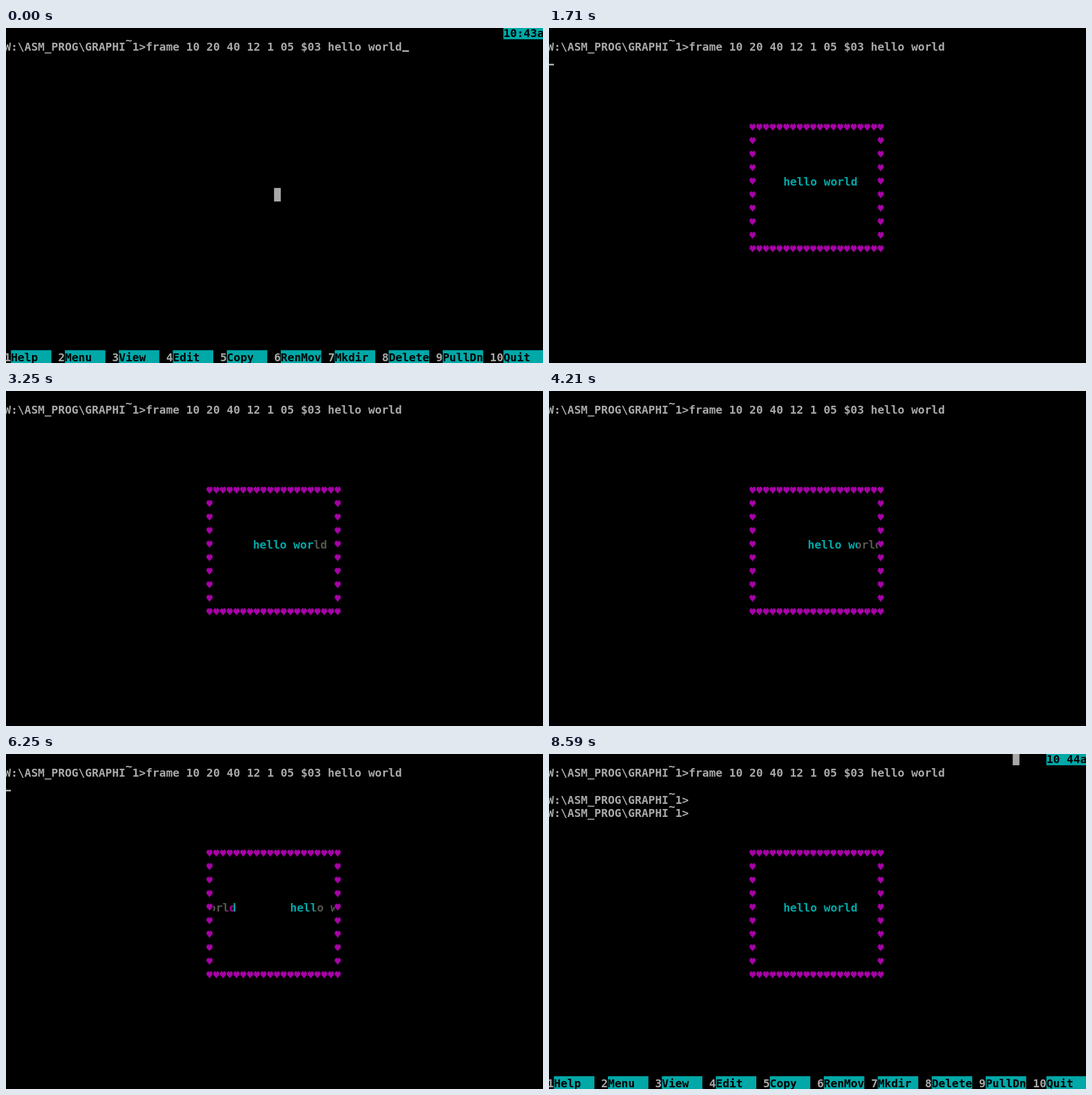
Write an HTML page that moves like this. It is 948 by 591 pixels and loops after 8.64 s.

```html
<!DOCTYPE html>
<html lang="en">
<head>
<meta charset="utf-8">
<title>Text mode frame</title>
<style>
  html, body { margin: 0; width: 100%; height: 100%; overflow: hidden; background: #000; }
  svg { display: block; }
  #screen { width: 948px; height: 591px; }
  text {
    font: bold 19.78px "DejaVu Sans Mono", monospace;
    white-space: pre;
  }
</style>
</head>
<body>
<svg id="screen" viewBox="0 0 948 591"></svg>
<script>
const LOOP = 8640;
const CW = 11.91, CH = 23.85, X0 = -3.2, Y0 = -4, PX = CW / 8, PY = CH / 14;
const GRAY = '#a8a8a8', CYAN = '#00a8a8', MAGENTA = '#a800a8', DARK = '#57554f', BLACK = '#000';

// Key times in ms
const MENU_OFF = 1100, CLOCK_OFF = 1330, FRAME_ON = 1450, SCROLL_ON = 2270;
const EXIT = 7500, SHELL_ON = 7750;

const screen = document.getElementById('screen');
const colX = c => X0 + c * CW;
const rowY = r => Y0 + r * CH;

function add(parent, tag, attrs = {}) {
  const el = document.createElementNS('http://www.w3.org/2000/svg', tag);
  for (const k in attrs) el.setAttribute(k, attrs[k]);
  parent.appendChild(el);
  return el;
}
const group = () => add(screen, 'g');

function block(parent, col, row, cols, fill) {
  return add(parent, 'rect', { x: colX(col), y: rowY(row), width: cols * CW, height: CH, fill });
}

// The tilde sits at the very top of its cell
function write(parent, col, row, str, fill) {
  const el = add(parent, 'text', { x: colX(col), y: rowY(row) + 20, fill });
  str.split(/(~)/).forEach((part, i) => {
    const dy = i === 0 ? 0 : part === '~' ? -12 : 12;
    add(el, 'tspan', { dy }).textContent = part;
  });
  return el;
}

function show(el, on) {
  el.setAttribute('visibility', on ? 'visible' : 'hidden');
}

// Command line and prompts
const PROMPT = 'W:\\ASM_PROG\\GRAPHI~1>';
write(screen, 0, 1, PROMPT + 'frame 10 20 40 12 1 05 $03 hello world', GRAY);
const prompt1 = group(), prompt2 = group();
write(prompt1, 0, 3, PROMPT, GRAY);
write(prompt2, 0, 4, PROMPT, GRAY);

// Function key bar
const menu = group();
'Help Menu View Edit Copy RenMov Mkdir Delete PullDn Quit'.split(' ').forEach((name, i) => {
  const key = String(i + 1), col = i * 8 + key.length;
  write(menu, i * 8, 24, key, GRAY);
  block(menu, col, 24, 8 - key.length - (i < 9 ? 1 : 0), CYAN);
  write(menu, col, 24, name, BLACK);
});

// Clock
const clock = group();
block(clock, 74, 0, 6, CYAN);
write(clock, 74, 0, '10', BLACK);
const colon = write(clock, 76, 0, ':', BLACK);
const minute = write(clock, 77, 0, '43a', BLACK);

// Border of hearts
const frame = group();
const HEART = 'M1 0H3V1H4V0H6V1H7V4H6V5H5V6H4V7H3V6H2V5H1V4H0V1H1Z';
function heart(col, row) {
  add(frame, 'path', {
    d: HEART, fill: MAGENTA,
    transform: `translate(${colX(col)} ${rowY(row) + 6}) scale(${PX} ${PY})`
  });
}
for (let c = 30; c < 50; c++) { heart(c, 7); heart(c, 16); }
for (let r = 8; r < 16; r++) { heart(30, r); heart(49, r); }

// Scrolling text: each column band keeps its own colour
const WRAP = 19 * CW;
const bands = [[31, 33, DARK], [33, 34, MAGENTA], [34, 46, CYAN], [46, 49, DARK]];
const movers = bands.map(([from, to, fill]) => {
  const x = colX(from), y = rowY(11), width = (to - from) * CW;
  const win = add(frame, 'svg', {
    x, y, width, height: CH, viewBox: `${x} ${y} ${width} ${CH}`, overflow: 'hidden'
  });
  const g = add(win, 'g');
  write(g, 35, 11, 'hello world', fill);
  write(g, 16, 11, 'hello world', fill);
  return g;
});

const mouse = block(screen, 0, 0, 1, GRAY);
const cursor = add(screen, 'rect', { width: CW, height: 2 * PX, fill: GRAY });

function cursorCell(t) {
  if (t < FRAME_ON) return [59, 1];
  if (t < EXIT) return [0, 2];
  return [21, t < SHELL_ON ? 3 : 4];
}

function render(t) {
  const shell = t >= SHELL_ON;
  show(menu, t < MENU_OFF || shell);
  show(clock, t < CLOCK_OFF || shell);
  show(colon, (t < CLOCK_OFF || shell) && t % 1000 < 500);
  minute.firstChild.textContent = shell ? '44a' : '43a';
  show(prompt1, t >= EXIT);
  show(prompt2, shell);
  show(frame, t >= FRAME_ON);

  const steps = t < SCROLL_ON || t >= EXIT ? 0 : Math.round((t - SCROLL_ON) * 0.0149);
  const dx = steps * PX % WRAP;
  movers.forEach(g => g.setAttribute('transform', `translate(${dx} 0)`));

  // The pointer hops from cell to cell towards the top right
  const p = Math.min(1, Math.max(0, (t - 200) / 600));
  const e = p * p * (3 - 2 * p);
  mouse.setAttribute('x', colX(Math.round(40 + 29 * e)));
  mouse.setAttribute('y', rowY(Math.round(12 - 12 * e)));
  show(mouse, t < CLOCK_OFF || shell);

  const [col, row] = cursorCell(t);
  const phase = (t - 2290) / 446 - 0.585;
  cursor.setAttribute('x', colX(col));
  cursor.setAttribute('y', rowY(row) + 13 * PX);
  show(cursor, phase - Math.floor(phase) < 0.5);
}

const start = performance.now();
function tick() {
  render((performance.now() - start) % LOOP);
  requestAnimationFrame(tick);
}
render(0);
requestAnimationFrame(tick);
</script>
</body>
</html>
```
